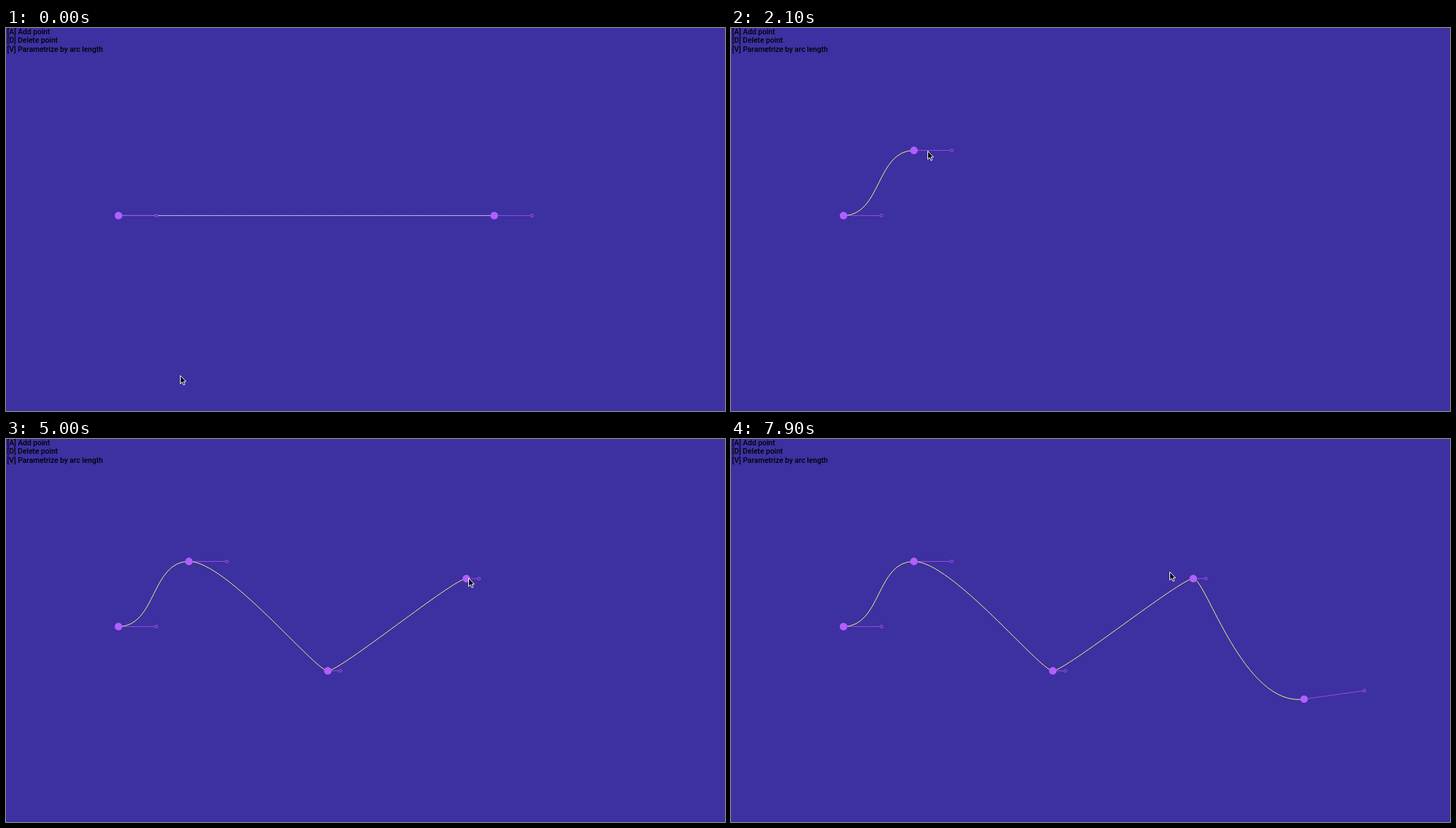
Recreate the animation shown at these times as an HTML page with a canvas. Size 1025 by 546 pixels, loop 8000 ms.

```html
<!DOCTYPE html>
<html lang="en">
<head>
<meta charset="utf-8">
<title>Curve editor</title>
<style>
  html, body { margin: 0; width: 100%; height: 100%; overflow: hidden; background: #3d30a1; }
  canvas { display: block; }
  p { position: absolute; left: 1.5px; top: 0; margin: 0; white-space: pre; color: #000;
      font: 500 10.6px/12.3px Roboto, sans-serif; }
</style>
</head>
<body>
<canvas width="1025" height="546"></canvas>
<p>[A] Add point
[D] Delete point
[V] Parametrize by arc length</p>
<script>
const LOOP = 8000, STEP = 100;
const LEAD = 45;                  // ms a dragged point trails the cursor
const LONG = [54, 0], SHORT = [18, 0], FINAL = [86, -12];
const ctx = document.querySelector('canvas').getContext('2d');

const add = (a, b) => a.map((n, i) => n + b[i]);

// Eased travel along a quadratic curve; ease 1 is linear, 2 slows down.
function move(t0, t1, from, via, to, ease = 1, lead = 0) {
  const at = t => {
    const u = Math.min(1, Math.max(0, (t - t0) / (t1 - t0)));
    const v = 1 - (1 - u) ** ease, w = 1 - v;
    return from.map((a, i) => w * w * a + 2 * w * v * via[i] + v * v * to[i]);
  };
  return { t0, from, to, at, lead };
}

const drag = (t0, t1, from, via, to, ease = 2) => move(t0, t1, from, via, to, ease, LEAD);
const spawn = last => add(last.to, SHORT);

const first = drag(600, 1800, [696, 267.4], [492, 297], [260.8, 174.5], .8);
const second = drag(2900, 3500, spawn(first).map((n, i) => n + [36, 0][i]), [358, 302], [458.8, 330.5]);
const third = drag(4100, 5100, spawn(second), [523, 197], [659, 199]);
const fourth = drag(5800, 6500, spawn(third), [730, 224], [817, 370.8]);
const tip = drag(7000, 7500, add(fourth.to, SHORT), add(fourth.to, [52, 3]), add(fourth.to, FINAL), 1);

const hover = (t0, t1, a, via, b) => move(t0, t1, a.to, via, b.from);
const cursorMoves = [
  move(100, 500, [247, 496], [450, 600], first.from), first,
  hover(2030, 2900, first, [384, 186], second), second,
  hover(3500, 4100, second, [570, 370], third), third,
  hover(5100, 5800, third, [775, 225], fourth), fourth,
  hover(6500, 6900, fourth, [826, 373], tip), tip,
  move(7600, 7900, tip.to, [795, 265], [624, 190])
];

const points = [
  { born: 0, at: () => [160.4, 267.4], reach: LONG },
  { born: 0, at: first.at, reach: LONG },
  { born: 2500, at: second.at, reach: SHORT },
  { born: 4000, at: third.at, reach: SHORT },
  { born: 5400, at: fourth.at, tip }
];

function cursorAt(t) {
  const m = cursorMoves.findLast(m => t >= m.t0) || cursorMoves[0];
  return m.at(t + m.lead);
}

function pose(p, t) {
  const [x, y] = p.at(t);
  const [hx, hy] = p.tip ? add(p.tip.at(t), p.tip.from.map((n, i) => SHORT[i] - n)) : p.reach;
  return { x, y, hx, hy };
}

function disc(x, y, r) {
  ctx.beginPath();
  ctx.arc(x, y, r, 0, Math.PI * 2);
}

function drawCurve(a, b) {
  ctx.beginPath();
  ctx.moveTo(a.x, a.y);
  ctx.bezierCurveTo(a.x + a.hx, a.y + a.hy, b.x - b.hx, b.y - b.hy, b.x, b.y);
  ctx.stroke();
}

function drawPoint({ x, y, hx, hy }) {
  const k = 1 - 2 / Math.hypot(hx, hy);
  ctx.strokeStyle = '#944fdf';
  ctx.beginPath();
  ctx.moveTo(x, y);
  ctx.lineTo(x + hx * k, y + hy * k);
  ctx.stroke();
  disc(x + hx, y + hy, 2);
  ctx.fillStyle = '#3d30a1';
  ctx.fill();
  ctx.strokeStyle = '#a856f0';
  ctx.stroke();
  disc(x, y, 5.4);
  ctx.fillStyle = '#b25eff';
  ctx.fill();
}

const arrow = new Path2D('M.5 .5V12.2L3.2 9.7L5.1 13.9L7 13.1L5.2 9H8.7Z');

function drawCursor([x, y]) {
  ctx.save();
  ctx.translate(Math.round(x + 1), Math.round(y - 1));
  ctx.fillStyle = '#000';
  ctx.fill(arrow);
  ctx.strokeStyle = '#fff';
  ctx.stroke(arrow);
  ctx.restore();
}

function draw(t) {
  ctx.clearRect(0, 0, 1025, 546);
  const live = points.filter(p => t >= p.born).map(p => pose(p, t));
  ctx.strokeStyle = t <= first.t0 ? '#cfc0ee' : '#f5f07c';
  live.slice(1).forEach((p, i) => drawCurve(live[i], p));
  live.forEach(drawPoint);
  drawCursor(cursorAt(t));
}

const start = performance.now();
function tick() {
  const t = (performance.now() - start) % LOOP;
  draw(Math.floor(t / STEP) * STEP);
  requestAnimationFrame(tick);
}
tick();
</script>
</body>
</html>
```
